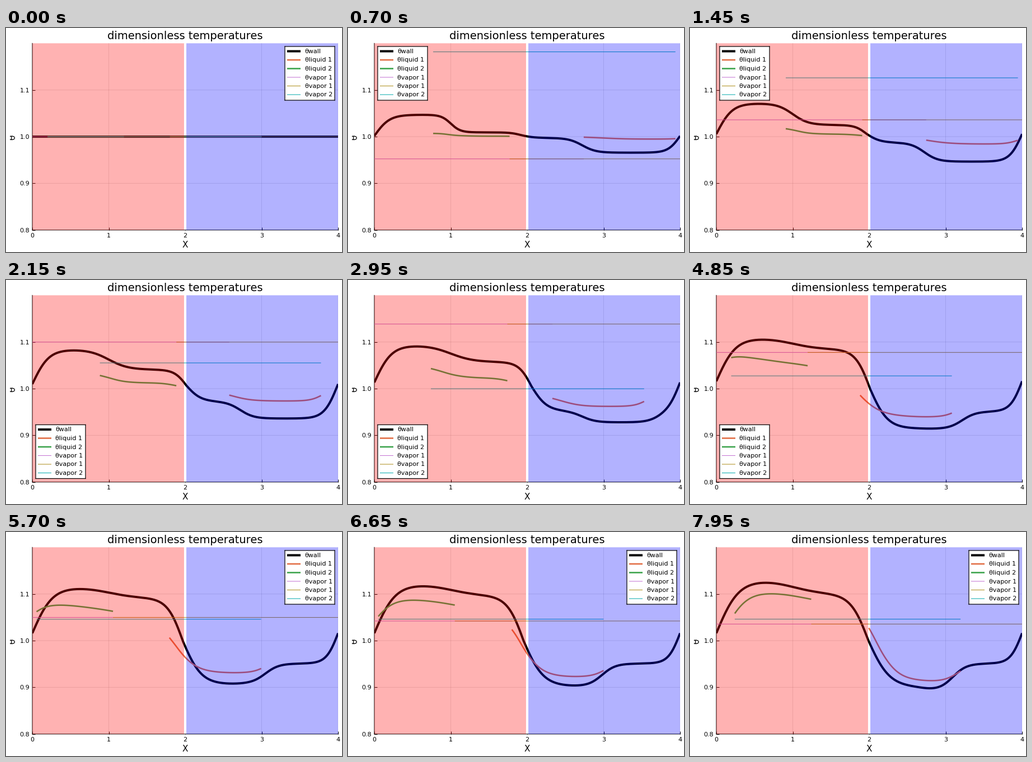
Recreate the animation shown at these times as a matplotlib script. Size 600 by 400 pixels, loop 8000 ms.

```python
import numpy as np
import matplotlib.pyplot as plt
from matplotlib.animation import FuncAnimation
from matplotlib.transforms import Bbox

plt.rcParams["font.family"] = "DejaVu Sans"
plt.rcParams["path.snap"] = False

W, H, DPI = 600, 400, 100
PX = 72 / DPI            # one pixel in points
FRAMES, STEP = 160, 50
LEN_A, LEN_B = 1.0, 1.2  # lengths of the two liquid slugs
LAG = 2.5                # seconds a slug needs to follow the wall

BLACK, ORANGE, GREEN = "#000000", "#e26f46", "#3da44d"
PURPLE, OLIVE, TEAL = "#c371d2", "#ac8d18", "#00a9ad"

FINE_X = np.linspace(0, 4, 400)
FINE_S = np.linspace(0, 1, 80)


def settle(t, tau, power=1):
    """Rise from 0 to 1."""
    return 1 - np.exp(-(t / tau)**power)


def step(x, centre, width):
    return (1 + np.tanh((x - centre) / width)) / 2


def mix(a, b, k):
    return a + (b - a) * k


def slug_centre(t):
    """Slow swing of both slugs after a quick push to the right."""
    swing = .56 * np.exp(-t / 22) * np.sin(.6 * (3.67 - t))
    return 1.33 + swing - .783 * np.exp(-t / .35)


def motion(t):
    """Slug starts and the two vapor temperatures at time t."""
    mean = 1 + settle(t, .9) * (.036 + .1165 * np.exp(-t / 2.5))
    swell = .25 * np.exp((1.3 - t) / 2.8) * settle(t, .6, 2)
    cycles = (t - 6.69) / .648 + .045 * np.cos(1.43 * (t - 2.15))
    diff = swell * np.sin(2 * np.pi * cycles)
    gap = .742 - .142 * np.exp(-t / .4) - 1.1 * diff
    a = slug_centre(t) - (gap + LEN_A) / 2
    return a, a + LEN_A + gap, mean + diff / 2, mean - diff / 2


def wall_temp(x, t):
    """Wall temperature above 1, built from smooth steps between levels."""
    hot = .075 * settle(t, .85) + .007 * t
    warm = .103 * settle(t, 3.4, 1.5)
    cool = -.100 * settle(t, 3.6, 2.2)
    cold = -.055 * settle(t, .9) - .0065 * t
    dry = max(cold, -.049)
    ends = .016 * settle(t, 2.2, 2)

    left = mix(hot, warm, step(x, 1.0, .38 - .36 * np.exp(-t / 2)))
    slug_end = slug_centre(max(t - .5, 0)) + .87 + LEN_B
    right = mix(cool, cold, step(x, 2.72, .18))
    right = mix(right, dry, step(x, slug_end, .18))

    middle = 2 + .09 * np.exp(-t / 10) * np.cos(t - 3.5)
    width = (.13 + .013 * t) * np.where(x < middle, 1, 1.2)
    temp = mix(left, right, step(x, middle, width))
    fade = np.tanh(x / (.19 + .013 * t)) * np.tanh((4 - x) / .155)
    return mix(ends, temp, fade)


def slug_x(start, length):
    return np.minimum(start + length * FINE_S, 4)


def slug_history():
    """Both slugs drift towards the wall they touch, frame by frame."""
    temps = np.zeros((FRAMES, 2, FINE_S.size))
    keep = np.exp(-STEP / 1000 / LAG)
    for i in range(1, FRAMES):
        t = i * STEP / 1000
        starts = motion(t)[:2]
        for j, length in enumerate((LEN_A, LEN_B)):
            touched = wall_temp(slug_x(starts[j], length), t)
            temps[i, j] = mix(touched, temps[i - 1, j], keep)
    return 1 + temps


SLUGS = slug_history()


def px_box(x0, y0, x1, y1):
    return [x0 / W, 1 - y1 / H, (x1 - x0) / W, (y1 - y0) / H]


fig = plt.figure(figsize=(W / DPI, H / DPI), dpi=DPI, facecolor="white")
ax = fig.add_axes(px_box(47, 27.3, 593, 360.8))
ax.set(xlim=(0, 4), ylim=(.8, 1.2), xticks=range(5), yticks=[.8, .9, 1, 1.1])
ax.set_yticklabels(["0.8", "0.9", "1.0", "1.1"])
ax.spines[["top", "right"]].set_visible(False)
for side in ("left", "bottom"):
    ax.spines[side].set_linewidth(PX)
ax.tick_params(direction="in", length=5 * PX, width=PX, pad=5 * PX, labelsize=8)
ax.set_axisbelow(True)
ax.grid(color="black", alpha=.1, linewidth=PX)

# Hot and cold halves tint the curves, with a bare strip between them
ax.axvspan(1.985, 2.015, color="white", lw=0, zorder=1.5)
ax.axvspan(0, 1.985, color="#ff0000", alpha=.3, lw=0, zorder=4)
ax.axvspan(2.015, 4, color="#0000ff", alpha=.3, lw=0, zorder=4)


def text(x, y, s, size, **kw):
    return fig.text(x / W, 1 - y / H, s, fontsize=size, ha="center", **kw)


text(320, 19.5, "dimensionless temperatures", 14, va="baseline")
text(320, 392.5, "X", 11, va="baseline")
# The left edge of the rotated label is cut off
text(12, 195, "θ", 11, va="center", rotation=90,
     clip_on=True, clip_box=Bbox.from_extents(7, 0, 47, H))

SERIES = [("θwall", BLACK, 4), ("θliquid 1", ORANGE, 2.6), ("θliquid 2", GREEN, 2.6),
          ("θvapor 1", PURPLE, 1), ("θvapor 1", OLIVE, 1), ("θvapor 2", TEAL, 1)]
wall, liquid_b, liquid_a, vapor_l, vapor_r, vapor_w = [
    ax.plot([], [], color=c, lw=w * PX, zorder=3, solid_capstyle="butt")[0]
    for _, c, w in SERIES]

CORNERS = {
    "top right": px_box(498, 33, 587, 129),
    "top left": px_box(53, 33, 142, 129),
    "bottom left": px_box(53, 258.5, 142, 354.5),
}
legend = fig.add_axes(CORNERS["top right"], zorder=10, facecolor="white")
legend.set(xlim=(0, 89), ylim=(96, 0), xticks=[], yticks=[])
for spine in legend.spines.values():
    spine.set_linewidth(1.2 * PX)
for row, (name, color, width) in enumerate(SERIES):
    y = 8.5 + 15.5 * row
    legend.plot([4, 28], [y, y], color=color, lw=width * PX, solid_capstyle="butt")
    legend.text(35.5, y + 3.5, name, fontsize=8, va="baseline")


def corner(v1, v2, right):
    """Keep the legend clear of the high vapor line."""
    if v1 > 1.071:
        return "bottom left"
    if v2 > 1.09 and right > 3.3:
        return "top left"
    return "top right"


def update(i):
    t = i * STEP / 1000
    a, b, v1, v2 = motion(t)
    a_end, b_end = a + LEN_A, min(b + LEN_B, 4)
    wall.set_data(FINE_X, 1 + wall_temp(FINE_X, t))
    liquid_a.set_data(slug_x(a, LEN_A), SLUGS[i, 0])
    liquid_b.set_data(slug_x(b, LEN_B), SLUGS[i, 1])
    vapor_l.set_data([0, b], [v1, v1])
    vapor_r.set_data([a_end, 4], [v1, v1])
    vapor_w.set_data([a, b_end], [v2, v2])
    legend.set_position(CORNERS[corner(v1, v2, b_end)])
    return wall, liquid_a, liquid_b, vapor_l, vapor_r, vapor_w, legend


anim = FuncAnimation(fig, update, frames=FRAMES, interval=STEP,
                     init_func=lambda: update(0), repeat=True, repeat_delay=0)
plt.show()
```
